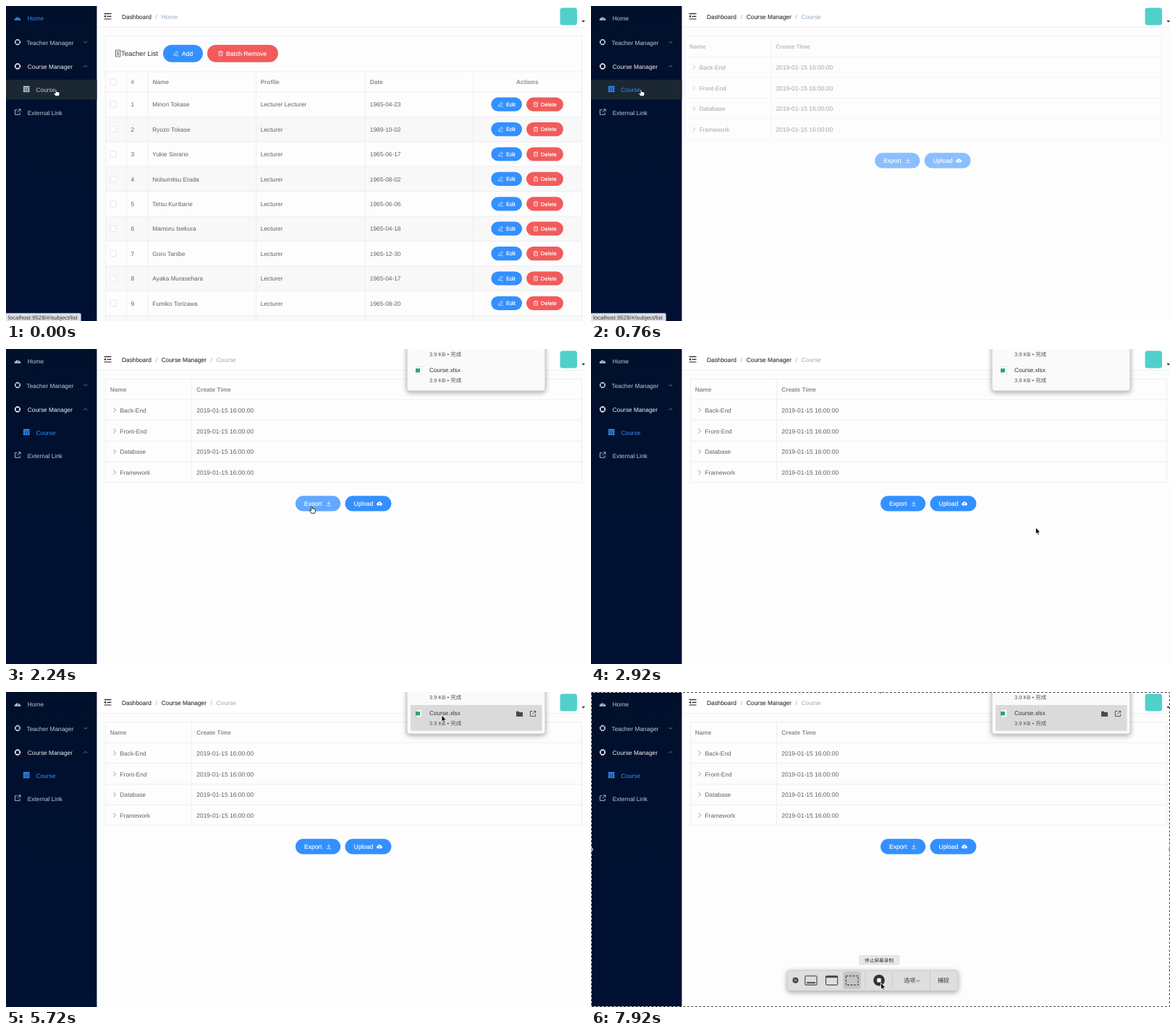
Animation, 800 px wide and 436 px high, one loop 7960 ms. Source, as an HTML page:

```html
<!DOCTYPE html>
<html lang="en">
<head>
<meta charset="utf-8">
<title>Course admin</title>
<style>
html, body { margin: 0; width: 100%; height: 100%; overflow: hidden; background: #fdfdfe; }
svg { display: block; width: 800px; height: 436px; }
text { font: 8.36px "Liberation Sans", "Noto Sans CJK SC", "Noto Sans CJK", sans-serif; fill: #606266; white-space: pre; text-rendering: geometricPrecision; }
</style>
</head>
<body>
<svg id="stage" viewBox="0 0 800 436"></svg>
<script>
const LOOP = 7960, BLUE = '#3390ff', RED = '#f15b5b', LINE = '#ebeef5', MENU = '#bfcbd9';

// SVG string helpers
const rect = (x, y, w, h, fill, more = '') =>
  `<rect x="${x}" y="${y}" width="${w}" height="${h}" fill="${fill}" ${more}/>`;
const text = (x, y, s, style = '') => `<text x="${x}" y="${y}" style="${style}">${s}</text>`;
const path = (d, stroke, width = 1, fill = 'none', more = '') =>
  `<path d="${d}" stroke="${stroke}" stroke-width="${width}" fill="${fill}" ${more}/>`;
const group = (id, s, more = '') => `<g id="${id}" ${more}>${s}</g>`;
const at = (x, y, s) => `<g transform="translate(${x} ${y})">${s}</g>`;
const circle = (x, y, r, fill, more = '') => `<circle cx="${x}" cy="${y}" r="${r}" fill="${fill}" ${more}/>`;
const fill = c => `fill:${c};`;
const size = n => `font-size:${n}px;`;
const BOLD = 'font-weight:bold;fill:#8b8e94;';
const hline = (y, x0 = 137.5, x1 = 795.5) => path(`M${x0} ${y}H${x1}`, LINE);
const vline = (x, y0, y1) => path(`M${x} ${y0}V${y1}`, LINE);

// Icons, centred on 0,0
const pencil = path('M-2.5 1 1.2-3 3-1.3-.8 2.4-2.7 2.8ZM0 3.2H3.4', '#fff', .7);
const bin = path('M-3.3-2H3.3M-1.2-2V-3.2H1.2V-2M-2.5-2V3.1H2.5V-2M-.8-.4V1.6M.8-.4V1.6', '#fff', .65);
const ring = c => circle(0, 0, 3.3, 'none', `stroke="${c}" stroke-width="1.7"`) +
  path('M-3-3-1.5-1.5M3-3 1.5-1.5M-3 3-1.5 1.5M3 3 1.5 1.5', '#001030', .7);
const gauge = `<path d="M-4.4 3.3A4.4 4.4 0 1 1 4.4 3.3Z"/>` + path('M0 2 1.4-1.8M-3 .5H-2M2 .5H3M-2-2-1.3-1.4', '#001030', .8);
const outlink = c => path('M-.5-3H-3.6V3.6H3.2V.8M1-3.8H4V-.8M4-3.8-.2.4', c, .9);
const grid = rect(-4.3, -4.2, 8.6, 8.4, 'currentColor') +
  path('M-4.3-1.8H4.3M-4.3 1.1H4.3M-1.4-1.8V4.2M1.5-1.8V4.2', '#0b1a35', .6);
const chevron = (x, y, up) => at(x, y, path(up ? 'M-2.4 1 0-1.2 2.4 1' : 'M-2.4-1 0 1.2 2.4-1', '#8796ad', .8));
const cloud = `<path fill="#fff" d="M-2.3 2.7A1.9 1.9 0 0 1-2.6-1 2.8 2.8 0 0 1 2.6-1 1.9 1.9 0 0 1 2.3 2.7Z"/>` +
  path('M0 2V-.8M-1.2.4 0-.9 1.2.4', BLUE, .7);
const download = path('M-3 3H3M0-3.2V1M-2-.8 0 1.2 2-.8', '#fff', .75);

const button = (x, y, w, h, color, label, tx, px, icon, ix, id = '') =>
  rect(x, y, w, h, color, `rx="${h / 2}" id="${id}"`) +
  text(tx, y + h / 2 + px * .36, label, fill('#fff') + size(px) + 'stroke:#fff;stroke-width:.15px;') +
  at(ix, y + h / 2, icon);

function sidebar() {
  return rect(0, 0, 125.5, 436, 'url(#navy)') +
    rect(0, 102, 125.5, 27.5, '#1b2732', 'id="rowHover"') +
    group('home', at(16, 16.5, gauge) + text(29.8, 20, 'Home', 'fill:inherit')) +
    at(16, 50, ring(MENU)) + text(28.5, 53.5, 'Teacher Manager', fill(MENU)) + chevron(109.8, 50) +
    at(16, 83.5, ring('#f4f4f5')) + text(29.8, 87, 'Course Manager', fill('#f4f4f5')) + chevron(109.8, 83.5, true) +
    group('course', at(28.2, 115, grid) + text(41.5, 118.8, 'Course', 'fill:currentColor')) +
    at(16, 146.7, outlink(MENU)) + text(29.8, 150.5, 'External Link', fill(MENU));
}

function header() {
  const dark = fill('#303133') + 'stroke:#303133;stroke-width:.12px;', soft = fill('#97a8be');
  const slash = x => text(x, 17.6, '/', fill('#a0a4ac'));
  return rect(125.5, 0, 675, 29, '#fff') + path('M125.5 29.5H800', '#eef0f3') +
    path('M135.5 10.7H145.5M139.5 14.3H145.5M135.5 18H145.5', '#222', 1.2) +
    '<path d="M135.3 14.3 138-1.8V16.2Z" transform="translate(0 0)" display="none"/>' +
    '<path d="M135.2 14.3 138 12.4V16.2Z" fill="#222"/>' +
    text(160, 17.6, 'Dashboard', dark) + slash(206.8) +
    group('crumbHome', text(214.8, 17.6, 'Home', soft)) +
    group('crumbCourse', text(214.8, 17.6, 'Course Manager', dark) + slash(282.6) + text(290.8, 17.6, 'Course', soft)) +
    rect(765.5, 2.5, 23.5, 24, '#50d0ca', 'rx="3.5"') +
    '<path d="M795.3 20H800L797.7 22.8Z" fill="#333"/>';
}

const teachers = [
  ['Minori Tokase', '1965-04-23'], ['Ryozo Tokase', '1989-10-02'], ['Yukie Sorano', '1965-06-17'],
  ['Nobumitsu Erada', '1965-08-02'], ['Tetsu Kuribane', '1965-06-06'], ['Mamoru Isekura', '1965-04-18'],
  ['Goro Tanibe', '1965-12-30'], ['Ayaka Murasehara', '1965-04-17'], ['Fumiko Torizawa', '1965-08-20'], ['', '']
];

function teacherPage() {
  const box = y => rect(144.2, y - 4, 8, 8, '#fff', 'rx="1" stroke="#dcdfe6" stroke-width=".8"');
  let s = hline(41.5) +
    path('M151.5 61H158V70H151.5ZM153 63.5H156.5M153 65.5H156.5M153 67.5H156.5', '#444', .8) +
    text(159, 69, 'Teacher List', size(9.5) + fill('#303133')) +
    button(217, 53.7, 55, 24, BLUE, 'Add', 243, 8.5, pencil, 235) +
    button(278, 53.7, 98, 24, RED, 'Batch Remove', 304, 8.6, bin, 296.5) +
    hline(91) + box(105);
  [['#', 172.5], ['Name', 202.5], ['Profile', 351.8], ['Date', 502.8], ['Actions', 705]]
    .forEach(([label, x]) => s += text(x, 108, label, BOLD));
  teachers.forEach(([name, date], i) => {
    const top = 119 + 34.4 * i, mid = top + 17.2, base = mid + 3.2;
    if (i % 2) s += rect(137.5, top, 658, 34.4, '#f8f8f9');
    s += hline(top) + box(mid) + text(172.5, base, i + 1) + text(202.3, base, name) +
      text(351.8, base, i ? 'Lecturer' : 'Lecturer Lecturer') + text(502.8, base, date) +
      button(670.3, mid - 9.6, 42.7, 19.2, BLUE, 'Edit', 691, 7.5, pencil, 683.3) +
      button(719, mid - 9.6, 51, 19.2, RED, 'Delete', 738.8, 7.6, bin, 732);
  });
  [137.5, 795.5].forEach(x => s += vline(x, 41.5, 436));
  [166.5, 196, 345.5, 496.5, 645.5].forEach(x => s += vline(x, 91, 436));
  return s;
}

function coursePage() {
  let s = text(143.7, 59.3, 'Name', BOLD) + text(263.2, 59.3, 'Create Time', BOLD);
  for (let i = 0; i < 6; i++) s += hline(41.5 + 28.65 * i);
  ['Back-End', 'Front-End', 'Database', 'Framework'].forEach((name, i) => {
    const y = 84.7 + 28.65 * i;
    s += path(`M148.6 ${y - 3}L151.6 ${y}L148.6 ${y + 3}`, '#777', .8) +
      text(157.5, y + 3.2, name) + text(263.2, y + 3.2, '2019-01-15 16:00:00', size(8.5));
  });
  [137.5, 256.5, 795.5].forEach(x => s += vline(x, 41.5, 184.8));
  return s + button(400, 203.3, 62.3, 21.2, BLUE, 'Export', 412, 8.5, download, 446, 'export') +
    button(468.5, 203.3, 64, 21.2, BLUE, 'Upload', 480.5, 8.5, cloud, 516);
}

function downloads() {
  const info = y => text(585, y, '3.9 KB • 完成', size(7.5) + fill('#555'));
  return rect(554, -8, 191, 66, '#fafafa', 'rx="3" stroke="#aaa" stroke-width=".6" filter="url(#shade)"') +
    rect(559, 18, 181.5, 35.7, '#dadada', 'id="fileHover"') +
    info(9.6) + text(585, 32, 'Course.xlsx', size(8.2) + fill('#333')) + info(45.6) +
    rect(567, 24.5, 7.5, 10.5, '#fff', 'stroke="#ccc" stroke-width=".5"') + rect(566, 27, 6, 5.5, '#2fa866') +
    group('fileTools', '<path d="M705 26.8H708.5L709.6 28H714V34H705Z" fill="#4a4a4a"/>' +
      at(728, 30, path('M-.5-3.5H-3.6V3.6H3.5V.5M1-3.7H3.7V-1M3.7-3.7-.8.8', '#4a4a4a', .9)));
}

function capture() {
  const dark = '#333', sep = x => path(`M${x} 387V411.5`, '#c6c6c6', .8);
  const frame = 'M.5.5H799.5V435.5H.5Z';
  return path(frame, '#fff', 1) + path(frame, '#444', 1, 'none', 'stroke-dasharray="3 2.5"') +
    [[0, 218], [800, 218], [400, 0], [400, 436]].map(([x, y]) =>
      circle(x, y, 2.4, '#888', 'stroke="#fff" stroke-width=".7"')).join('') +
    rect(271, 385, 236, 28.5, '#dedede', 'rx="4" stroke="#bbb" stroke-width=".6" filter="url(#shade)"') +
    circle(282.5, 399, 4, '#444') + path('M281 397.5 284 400.5M284 397.5 281 400.5', '#eee', .8) +
    rect(295.8, 393, 16.2, 12.5, 'none', `rx="1" stroke="${dark}"`) + path('M298 402.5H310', dark, 1.8) +
    rect(324.5, 393, 16.2, 12.5, 'none', `rx="1" stroke="${dark}"`) + path('M324.5 394.3H340.7', dark, 2) +
    rect(348.5, 387, 24.3, 24, '#c4c4c4', 'rx="3"') +
    rect(352.3, 393, 16.8, 12.5, 'none', `stroke="${dark}" stroke-dasharray="3 1.6"`) +
    sep(379) + circle(398, 399, 7.8, '#333') + rect(395.3, 396.3, 5.4, 5.4, '#fff', 'rx=".6"') +
    sep(416.5) + text(432.2, 402, '选项', size(8) + fill(dark)) + path('M449.7 398.8 451.8 400.8 453.9 398.8', dark, .8) +
    sep(468.5) + text(479, 402, '捕捉', size(8) + fill(dark)) +
    group('tip', rect(370.8, 365, 55, 12, '#e8e8e8', 'rx="1.5" stroke="#ccc" stroke-width=".6"') +
      text(378, 373.6, '停止屏幕录制', size(6.7) + fill('#333')));
}

document.getElementById('stage').innerHTML = `<defs>
  <linearGradient id="navy" x2="0" y2="1"><stop stop-color="#00102c"/><stop offset="1" stop-color="#001034"/></linearGradient>
  <filter id="shade" x="-20%" y="-50%" width="140%" height="200%"><feDropShadow dx="0" dy="2" stdDeviation="3.5" flood-opacity=".35"/></filter>
  </defs>` +
  rect(0, 0, 800, 436, '#fdfdfe') + group('teacherPage', teacherPage()) + group('coursePage', coursePage()) +
  header() + sidebar() +
  group('status', rect(-2, 425.3, 105.5, 13, '#dee1e6', 'rx="2" stroke="#b8bbc0" stroke-width=".5"') +
    text(3, 433.6, 'localhost:9528/#/subject/list', size(7.85) + fill('#333'))) +
  group('downloads', downloads()) + group('capture', capture()) +
  group('pointer',
    group('arrow', path('M0 0V9.2L2 7.3 3.4 10.5 4.9 9.8 3.5 6.8H6.4Z', '#fff', .8, '#000')) +
    group('hand', path('M-.9.8Q0-.4.9.8V3.6Q2-3 2.6 4 3.5 3.4 4 4.4 5 4.2 5 5.4V7.4L4.2 9.8H-.7L-3.2 6.3Q-3.2 4.9-1.9 5.4L-.9 6.3Z'
      .replace('Q2-3 2.6 4', 'Q2 3 2.6 4'), '#000', .8, '#fff')));

const el = id => document.getElementById(id);
const show = (id, on) => el(id).style.display = on ? '' : 'none';
const clamp = v => Math.max(0, Math.min(1, v));

// CSS "ease" curve: cubic-bezier(.25, .1, .25, 1)
function ease(x) {
  x = clamp(x);
  let lo = 0, hi = 1, u;
  const bez = (a, b) => 3 * u * (1 - u) ** 2 * a + 3 * u * u * (1 - u) * b + u ** 3;
  for (let i = 0; i < 20; i++) {
    u = (lo + hi) / 2;
    if (bez(.25, .25) < x) lo = u; else hi = u;
  }
  return bez(.1, 1);
}

// Pointer stops: time, x, y
const stops = [
  [0, 69, 115], [1050, 69, 115], [1720, 422.5, 217.5], [2320, 422.5, 217.5], [2680, 622, 281],
  [2920, 614.5, 247], [3220, 592, 140], [4040, 565, 54.5], [4600, 602, 32], [6250, 602, 32],
  [7180, 400.5, 399], [7500, 400.5, 402.5], [LOOP, 400.5, 402.5]
];
function pointerAt(t) {
  const i = stops.findIndex(s => s[0] > t), [t0, x0, y0] = stops[i - 1], [t1, x1, y1] = stops[i];
  const k = (t - t0) / (t1 - t0), e = k * k * (3 - 2 * k);
  return [x0 + (x1 - x0) * e, y0 + (y1 - y0) * e];
}

const CLICK = 80, ENTER = 597, FADE = 500, SLIDE = 18;
function slide(id, x, opacity) {
  el(id).setAttribute('transform', `translate(${x} 0)`);
  el(id).setAttribute('opacity', opacity);
}

function draw(t) {
  const [x, y] = pointerAt(t), clicked = t >= CLICK;
  const onMenu = x < 125.5 && y > 102 && y < 129.5;
  const onExport = t > ENTER && x > 400 && x < 462 && y > 203 && y < 225;
  const out = ease((t - CLICK) / FADE), inn = ease((t - ENTER) / FADE);

  show('teacherPage', t < ENTER);
  show('coursePage', t >= ENTER);
  slide('teacherPage', SLIDE * out, 1 - out);
  slide('coursePage', SLIDE * (inn - 1), inn);
  show('crumbHome', !clicked);
  show('crumbCourse', clicked);
  el('home').setAttribute('fill', clicked ? MENU : BLUE);
  el('course').setAttribute('color', clicked ? BLUE : MENU);

  show('rowHover', onMenu);
  show('status', onMenu);
  el('export').setAttribute('fill', onExport ? '#61a8ff' : BLUE);
  show('downloads', t >= 2240);
  show('fileHover', t >= 3960);
  show('fileTools', t >= 4400);
  show('capture', t >= 6040);
  show('tip', t >= 7560);

  const hand = onMenu || onExport;
  show('hand', hand);
  show('arrow', !hand);
  el('pointer').setAttribute('transform', `translate(${x} ${y})`);
}

const start = performance.now();
function tick() {
  draw((performance.now() - start) % LOOP);
  requestAnimationFrame(tick);
}
tick();
</script>
</body>
</html>
```
